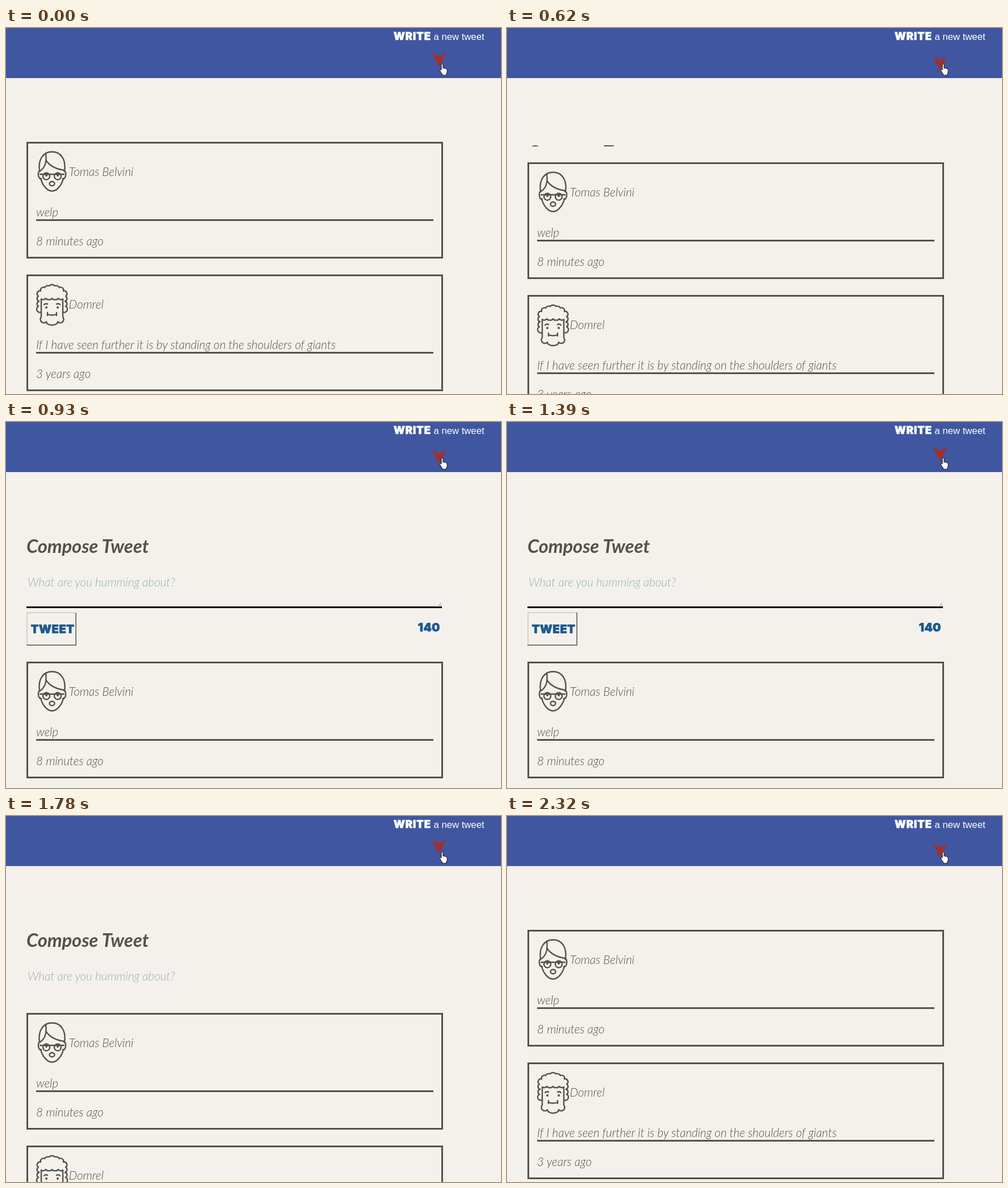
Animation of 871x643 px, one loop 2.4 s. Source, as an HTML page:

```html
<!DOCTYPE html>
<html lang="en">
<head>
<meta charset="utf-8">
<title>Compose panel</title>
<style>
  html, body { margin: 0; width: 100%; height: 100%; overflow: hidden; background: #f4f1ec; }
  svg { display: block; }
  text { white-space: pre; }
  .thin { font: italic 300 20.6px Lato, "Open Sans", sans-serif; fill: #545149; }
  .hint { fill: #94adba; }
  .title { font: italic 700 32.6px Lato, "Open Sans", sans-serif; fill: #545149; }
  .block { font: 900 20.5px Inter, "DejaVu Sans", sans-serif; letter-spacing: .3px; fill: #1b5890; stroke: #1b5890; stroke-width: .6px; }
  .write { font-size: 18.5px; letter-spacing: .8px; fill: #fff; stroke: #fff; }
  .link { font: 16.7px "Liberation Sans", Arial, sans-serif; fill: #fff; }
  .line { fill: none; stroke: #545149; stroke-width: 3px; }
  .face { fill: none; stroke: #545149; stroke-width: 2.4px; stroke-linecap: round; stroke-linejoin: round; }
  .dot { fill: #545149; stroke: none; }
</style>
</head>
<body>
<svg width="871" height="643" viewBox="0 0 871 643">
  <defs>
    <clipPath id="clip"><rect id="window" y="90" width="871" height="0"/></clipPath>
    <g id="card">
      <rect class="line" x="37.5" y="1.5" width="730" height="202"/>
      <path class="line" d="M53 137.5H752"/>
    </g>
  </defs>

  <g clip-path="url(#clip)">
    <text class="title" x="36" y="230">Compose Tweet</text>
    <text class="thin hint" x="38" y="289">What are you humming about?</text>
    <path d="M36 325.5H767" stroke="#000" stroke-width="3"/>
    <path d="M759 325l7-7M763 325l3-3" stroke="#77756f"/>
    <path d="M37 393V335H124" fill="none" stroke="#d3d2cf" stroke-width="2"/>
    <path d="M36 392H123V335" fill="none" stroke="#7b7a77" stroke-width="2"/>
    <text class="block" x="43.5" y="371">TWEET</text>
    <text class="block" x="764" y="368" text-anchor="end">140</text>
  </g>

  <g id="cards">
    <g transform="translate(0 200)">
      <use href="#card"/>
      <g class="face">
        <path d="M59 51C56 30 66 17.5 81 17.5S106 30 103 51"/>
        <path d="M70 20Q73 43 60 51M70 32Q80 47 103 50"/>
        <path d="M60 51Q56 52 57 59Q58 65 62 65M102 51Q106 52 105 59Q104 65 100 65"/>
        <path d="M61 64C64 77 73 86.5 81 86.5S98 77 101 64"/>
        <path d="M60 57H102"/>
        <circle cx="71" cy="60.5" r="6"/><circle cx="91" cy="60.5" r="6"/>
        <ellipse cx="81" cy="73.5" rx="4.5" ry="3.7"/>
        <circle class="dot" cx="71" cy="59" r="2"/><circle class="dot" cx="91" cy="59" r="2"/>
      </g>
      <text class="thin" x="110.5" y="60">Tomas Belvini</text>
      <text class="thin" x="53" y="131">welp</text>
      <text class="thin" x="53" y="182">8 minutes ago</text>
    </g>
    <g transform="translate(0 433)">
      <use href="#card"/>
      <g class="face">
        <path d="M58 47a5 5 0 0 1-1-9a5 5 0 0 1 4-9a5 5 0 0 1 7-6a6 5 0 0 1 8-3a6 5 0 0 1 10 0a6 5 0 0 1 8 3a5 5 0 0 1 7 6a5 5 0 0 1 4 9a5 5 0 0 1-1 9"/>
        <path d="M58 47a5 5 0 0 0-1 9a5 5 0 0 0 5 10M104 47a5 5 0 0 1 1 9a5 5 0 0 1-5 10"/>
        <path d="M62 75V43a5 4 0 0 0 8-1a6 4 0 0 0 11 0a6 4 0 0 0 11 0a5 4 0 0 0 8 1V75a6 6 0 0 1-9 8a10 6 0 0 1-20 0a6 6 0 0 1-9-8"/>
        <path d="M67 53q3-3 6-1M89 52q3-2 6 1M73 70q8 3 16 0M73 67v5M89 67v5"/>
        <circle class="dot" cx="71" cy="58" r="2"/><circle class="dot" cx="91" cy="58" r="2"/>
      </g>
      <text class="thin" x="110.5" y="60">Domrel</text>
      <text class="thin" x="53" y="131">If I have seen further it is by standing on the shoulders of giants</text>
      <text class="thin" x="53" y="182">3 years ago</text>
    </g>
  </g>

  <rect width="871" height="88" fill="#4056a1"/>
  <text class="block write" x="682" y="21">WRITE</text>
  <text class="link" x="752.5" y="21">a new tweet</text>
  <path id="arrow" d="M-12.5 0L0 6L12.5 0L0 25z" fill="#a0302e"/>
  <path d="M766 65q0-2 1.5-2t1.5 2v6q.5-1 1.7-.7q1 .2 1 1q.7-.8 1.7-.4q1 .2 1 1.2q1.8-.4 1.8 1.4v3.5q0 2-1.5 4v2h-7v-2q-2-2-4-6q-1-2 .3-2.5q1.5-.3 2 1.5z" fill="#fff" stroke="#111"/>
</svg>
<script>
  const LOOP = 2400, STEPS = 31, OPEN = 221;
  const [cards, clip, arrow] = ["cards", "window", "arrow"].map(id => document.getElementById(id));

  // [step, y] points of the hovering arrow
  const bob = [[0, 44], [8, 50], [12, 49], [18, 44], [22, 42], [25, 41], [28, 46], [30, 49]];

  const swing = (t, start, length) => {
    const p = Math.min(1, Math.max(0, (t - start) / length));
    return 0.5 - Math.cos(p * Math.PI) / 2;
  };

  function along(points, x) {
    const i = Math.max(1, points.findIndex(p => p[0] >= x));
    const [x0, y0] = points[i - 1], [x1, y1] = points[i];
    return y0 + (y1 - y0) * (x - x0) / (x1 - x0);
  }

  function draw(now) {
    // the picture advances at 31 steps per loop
    const step = Math.min(STEPS - 1, Math.floor((now % LOOP + 14) * STEPS / LOOP));
    const t = step * LOOP / STEPS;
    const shift = Math.round(OPEN * (swing(t, 514, 400) - swing(t, 1608, 436)));
    cards.setAttribute("transform", `translate(0 ${shift})`);
    clip.setAttribute("height", shift ? shift + 82 : 0);
    arrow.setAttribute("transform", `translate(762 ${along(bob, step)})`);
  }

  const begin = performance.now();
  function tick() {
    draw(performance.now() - begin);
    requestAnimationFrame(tick);
  }
  tick();
</script>
</body>
</html>
```
